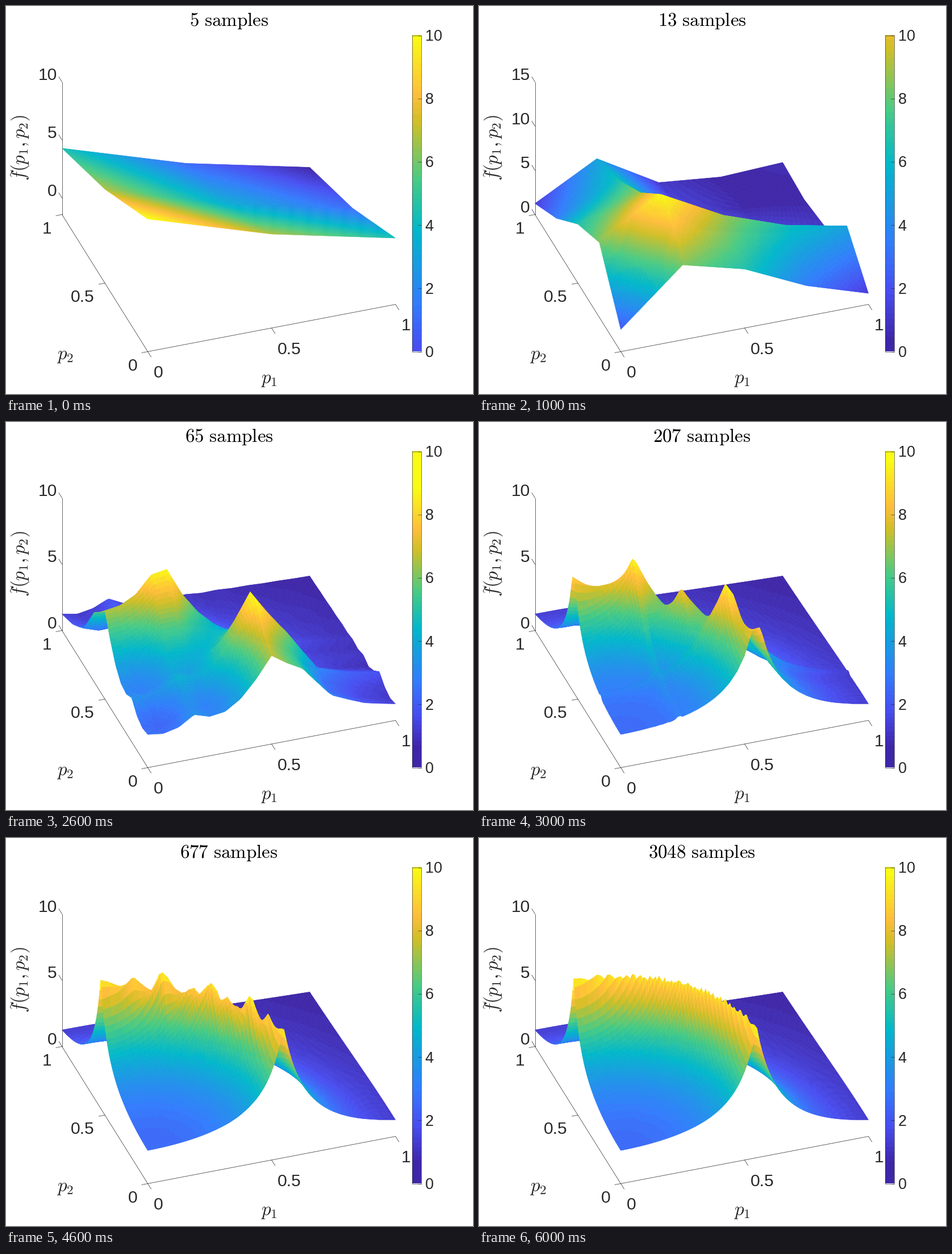
A matplotlib script for the animation above (7000 ms loop, 822 px wide and 682 px high).

```python
import numpy as np
import matplotlib.pyplot as plt
from matplotlib.animation import FuncAnimation
from matplotlib.collections import PolyCollection
from matplotlib.colors import LinearSegmentedColormap

W, H, DPI = 822, 682, 100
PT = 72 / DPI
INK = "#262626"
plt.rcParams["mathtext.fontset"] = "cm"
plt.rcParams["font.family"] = "Liberation Sans"

# Screen position of the box corner and of the unit steps along p1 and p2
ORIGIN = np.array([249, 607])
P1 = np.array([436, -83])
P2 = np.array([-151, -241])
HEIGHT = 233

# Number of samples and depth of the sparse grid
STAGES = {5: 1, 13: 2, 65: 4, 207: 6, 677: 9, 1417: 11, 3048: 13}

COLOR_STOPS = {0: "#3e26a8", 8: "#484df0", 16: "#327cfc", 29: "#01b8ca",
               38: "#4acb84", 48: "#d1bf27", 53: "#febe3c", 63: "#f9fb15"}
CMAP = LinearSegmentedColormap.from_list(
    "ridge", [(step / 63, color) for step, color in COLOR_STOPS.items()], N=64)


def ridge(x, y):
    return 1 / (np.abs(0.3 - x**2 - y**2) + 0.1)


# Adaptive sparse grid with piecewise linear hierarchical hats

def hat(t, level, node):
    h = np.maximum(0, 1 - np.abs(t[:, None] - node) * 2.0**level)
    return np.where(level == 0, 1, h)


def children(level, node):
    if level == 0:
        return [(1, 0.0), (1, 1.0)]
    if level == 1:
        return [(2, 0.25 + 0.5 * node)]
    step = 0.5 ** (level + 1)
    return [(level + 1, node - step), (level + 1, node + step)]


def sparse_grid(depth, eps, limit):
    """Nodes (level, p1, level, p2) and weights, or None above the limit."""
    nodes, weights = np.empty((0, 4)), np.empty(0)
    active = {(0, 0.5, 0, 0.5)}
    for _ in range(depth + 1):
        if len(nodes) + len(active) > limit:
            return None
        if not active:
            break
        new = np.array(sorted(active))
        x, y = new[:, 1], new[:, 3]
        basis = hat(x, nodes[:, 0], nodes[:, 1]) * hat(y, nodes[:, 2], nodes[:, 3])
        surplus = ridge(x, y) - basis @ weights
        nodes = np.vstack([nodes, new])
        weights = np.append(weights, surplus)
        active = set()
        for la, a, lb, b in new[np.abs(surplus) >= eps].tolist():
            active.update((*c, lb, b) for c in children(la, a))
            active.update((la, a, *c) for c in children(lb, b))
    return nodes, weights


def fit_grid(samples, depth):
    """Finest grid of the given depth that needs no more than the samples."""
    grid = sparse_grid(depth, 0, samples)
    if grid:
        return grid
    low, high = np.log(1e-5), np.log(5)
    for _ in range(11):
        mid = (low + high) / 2
        trial = sparse_grid(depth, np.exp(mid), samples)
        if trial:
            grid, high = trial, mid
        else:
            low = mid
    return grid


T = np.linspace(0, 1, 101)
GX, GY = np.meshgrid(T, T)
FLOOR = ORIGIN + GX[..., None] * P1 + GY[..., None] * P2
BACK_TO_FRONT = np.argsort(FLOOR[:-1, :-1, 1].ravel(), kind="stable")


def surface(samples, depth):
    nodes, weights = fit_grid(samples, depth)
    hx = hat(T, nodes[:, 0], nodes[:, 1])
    hy = hat(T, nodes[:, 2], nodes[:, 3])
    return (hy * weights) @ hx.T


SCENES = [(n, surface(n, depth)) for n, depth in STAGES.items()]

fig = plt.figure(figsize=(W / DPI, H / DPI), dpi=DPI, facecolor="white")
ax = fig.add_axes([0, 0, 1, 1])


def line(a, b, width=0.7, zorder=1):
    ax.plot([a[0], b[0]], [a[1], b[1]], color=INK, lw=width * PT, zorder=zorder)


def number(x, y, value, size=30, ha="left"):
    ax.text(x, y + 0.35 * size, f"{value:g}", size=size * PT, color=INK,
            ha=ha, va="baseline", zorder=4)


def formula(x, y, tex, size=33, color=INK, va="baseline", rotation=0):
    ax.text(x, y, f"${tex}$", size=size * PT, color=color, ha="center",
            va=va, rotation=rotation, zorder=4)


def draw_axes(low, high):
    corner = ORIGIN + P2
    line(ORIGIN, ORIGIN + P1)
    line(ORIGIN, corner)
    line(corner, corner - [0, HEIGHT])

    for v in (0, 0.5, 1):
        x, y = ORIGIN + v * P1
        line((x, y), (x + 6, y + 9.5))
        number(x + 10, y + 35, v)
        x, y = ORIGIN + v * P2
        line((x, y), (x - 10.5, y + 2))
        number(x - 18.5, y + 23, v, ha="right")
    for v in range(0, high + 1, 5):
        x, y = corner - [0, HEIGHT * (v - low) / (high - low)]
        line((x, y), (x - 5.5, y - 9))
        number(x - 9, y - 14, v, ha="right")

    formula(462, 662, "p_1")
    formula(104, 621, "p_2")
    formula(24.5, 249, "f(p_1,p_2)", va="center", rotation=90)
    formula(6.5, 294, r"\sim", size=18, va="center", rotation=90)


def draw_surface(z, low, high, norm):
    xy = FLOOR.copy()
    xy[..., 1] -= HEIGHT * (z - low) / (high - low)
    corners = [xy[:-1, :-1], xy[:-1, 1:], xy[1:, 1:], xy[1:, :-1]]
    quads = np.stack(corners, axis=2).reshape(-1, 4, 2)
    # Flat shading: each cell takes the value of its first corner
    colors = CMAP(norm(z[:-1, :-1].ravel()))
    ax.add_collection(PolyCollection(
        quads[BACK_TO_FRONT], facecolors=colors[BACK_TO_FRONT],
        edgecolors="face", linewidths=0.5 * PT, zorder=2), autolim=False)


def draw_colorbar(norm):
    left, right, top, bottom = 714, 730, 51, 607
    values = np.linspace(10, 0, bottom - top)[:, None]
    ax.imshow(CMAP(norm(values)), extent=(left, right, bottom, top),
              aspect="auto", interpolation="nearest", zorder=2)
    ax.plot([left, right, right, left, left], [top, top, bottom, bottom, top],
            color=INK, lw=0.6 * PT, zorder=3)
    for v in range(0, 11, 2):
        y = bottom - (bottom - top) * v / 10
        line((right - 5.5, y), (right, y), width=0.6, zorder=3)
        number(737, y, v, size=27)


def draw(i):
    ax.clear()
    ax.axis("off")
    samples, z = SCENES[i]
    norm = plt.Normalize(z.min(), z.max())
    low = min(0, z.min())
    high = 5 * int(np.ceil(z.max() / 5 - 0.1))
    draw_axes(low, high)
    draw_surface(z, low, high, norm)
    draw_colorbar(norm)
    formula(392, 34.5, rf"\mathrm{{{samples}\ samples}}", color="black")
    ax.set_xlim(-0.5, W - 0.5)
    ax.set_ylim(H - 0.5, -0.5)
    return []


anim = FuncAnimation(fig, draw, frames=len(SCENES), interval=1000,
                     init_func=lambda: [], repeat=True, repeat_delay=0)
plt.show()
```
